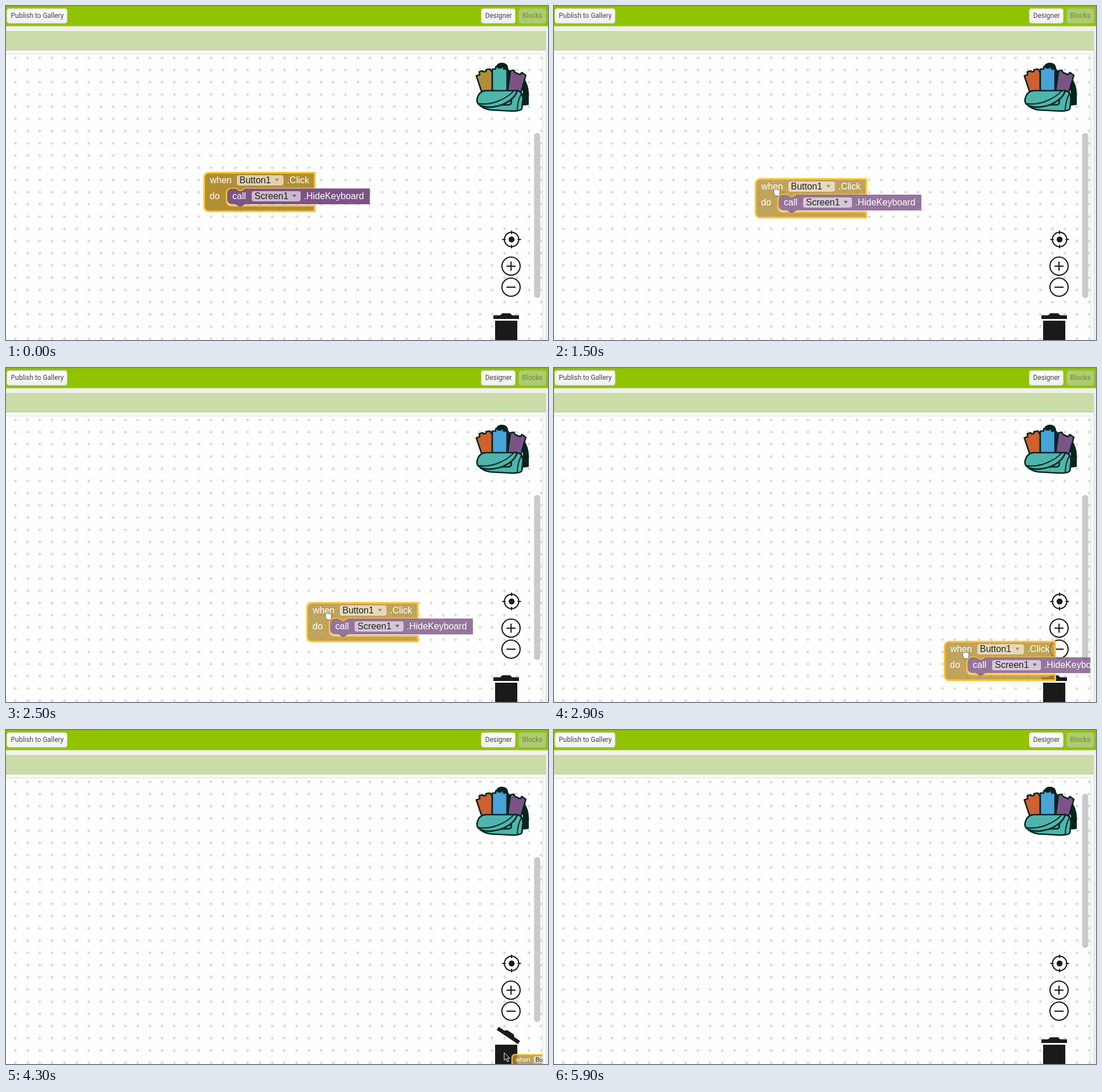
An HTML page for the animation above (6500 ms loop, 953 px wide and 588 px high).

```html
<!DOCTYPE html>
<html lang="en">
<head>
<meta charset="utf-8">
<title>Deleting a block</title>
<style>
html, body { margin: 0; width: 100%; height: 100%; overflow: hidden; background: #fff; }
svg { display: block; width: 953px; height: 588px; }
.ui { font: 12px Roboto, Arial, sans-serif; fill: #444; }
.code { font: 16px "Liberation Sans", Arial, sans-serif; fill: #fff; }
.code .field { fill: #222; }
.held .shape { fill-opacity: .8; }
.icon { fill: #fff; stroke: #1a1a1a; stroke-width: 2.1; }
.pack { stroke: #06231f; stroke-width: 2.6; stroke-linejoin: round; stroke-linecap: round; }
</style>
</head>
<body>
<svg viewBox="0 0 953 588">
  <defs>
    <linearGradient id="btn" x2="0" y2="1">
      <stop stop-color="#fff"/><stop offset="1" stop-color="#efefef"/>
    </linearGradient>
    <pattern id="grid" x="5.5" y="80.5" width="21.5" height="21.5" patternUnits="userSpaceOnUse">
      <path d="M8 10.75h6M11 7.75v6" stroke="#c0c0c0"/>
    </pattern>
    <clipPath id="space"><path d="M0 85H943V588H0z"/></clipPath>
  </defs>

  <rect width="953" height="588" fill="#f0f1ec"/>
  <rect width="953" height="35.5" fill="#91c300"/>
  <rect width="953" height="1" fill="#86b30c"/>
  <rect y="44" width="949" height="34" fill="#ccdca9"/>
  <rect y="77" width="949" height="1" fill="#b5c79a"/>
  <rect y="78" width="949" height="510" fill="#f8faf5"/>
  <path d="M949.5 44V588" stroke="#d9dad5"/>
  <rect y="85" width="943" height="503" fill="#fefefe"/>
  <rect y="85" width="943" height="503" fill="url(#grid)"/>
  <path d="M0 84.5H943.5V588" fill="none" stroke="#dde0d8"/>

  <g class="ui">
    <rect x="1.5" y="4.5" width="106" height="26" rx="4" fill="url(#btn)" stroke="#c8ccbe"/>
    <rect x="835.5" y="4.5" width="60" height="26" rx="4" fill="url(#btn)" stroke="#c8ccbe"/>
    <rect x="901.5" y="4.5" width="48" height="26" rx="4" fill="#adcb74" stroke="#a2c45c"/>
    <text x="8.5" y="21">Publish to Gallery</text>
    <text x="842.5" y="21">Designer</text>
    <text x="907.5" y="21" fill="#6f8a32">Blocks</text>
  </g>

  <g class="pack">
    <path d="M861 112Q863 101 872 101T882 111L890 122V150H848V122z" fill="#06231f"/>
    <path d="M909 126Q918 140 918 154L918 173 910 174Q912 150 906 134z" fill="#06231f"/>
    <path id="card1" d="M827 123l6 -2 -1 -5 6 -2 2 2 4 -1 0 -3 7 -1 4 6V150H836z"/>
    <path d="M887 114l6 -1 2 4 9 4 3 -4 7 5L905 153 882 150z" fill="#7c5385"/>
    <path id="card2" d="M855 111h6v-4h3l2 2h4l2 -2h3v4h6V150H855z"/>
    <path d="M838 151L899 149Q909 151 909 163L907 181Q905 185 890 185L852 183Q838 181 832 173z" fill="#4fb5ac"/>
    <path d="M868 174l19 -14 2 3 -1 9 -3 2z" fill="#4fb5ac"/>
    <path d="M828 166Q830 150 844 149L899 149Q894 165 872 174Q850 181 836 176Q828 173 828 166z" fill="#4fb5ac"/>
    <path d="M832 172Q848 174 864 168Q884 160 892 150M907 153Q899 167 899 184" fill="none" stroke-width="2"/>
  </g>

  <g class="icon">
    <circle cx="889" cy="411" r="12.6"/>
    <path d="M889 395.500v6M889 420.500v6M872.500 411h6M899.500 411h6"/>
    <circle cx="889" cy="411" r="4.200" fill="#1a1a1a"/>
    <circle cx="888" cy="458" r="16"/>
    <path d="M880 458h16M888 450v16"/>
    <circle cx="888" cy="495" r="16"/>
    <path d="M880 495h16"/>
  </g>
  <rect id="bar" x="928.5" width="11" rx="5.5" fill="#cacaca"/>

  <g fill="#1a1a1a">
    <rect x="860" y="554" width="39" height="34"/>
    <path id="lid" d="M857 551v-6.500h12l3.500 -3.500h14l3.500 3.500h12v6.500z"/>
  </g>

  <g clip-path="url(#space)">
    <g id="block" class="code">
      <path class="shape" d="M9.500 1.500H196V29.500H73l-6 4h-4l-6 -4H49a8 8 0 0 0 -8 8V51.500a8 8 0 0 0 8 8H196V69.500H9.500a8 8 0 0 1 -8 -8V9.500a8 8 0 0 1 8 -8z"
        fill="#b18e35" stroke="#fdc52e" stroke-width="3"/>
      <path class="shape" d="M50 29.500H57l6 4h4l6 -4H293V57H73l-6 4h-4l-6 -4H50a8 8 0 0 1 -8 -8V37.500a8 8 0 0 1 8 -8z" fill="#7c5385"/>
      <path d="M73 29.500H292.500V57" fill="none" stroke="#9a7aa2"/>
      <g fill="#fff" fill-opacity=".6">
        <rect x="59" y="6" width="82" height="18" rx="4"/>
        <rect x="85" y="34" width="86" height="18" rx="4"/>
      </g>
      <path d="M126 12h7l-3.500 5z" fill="#b18e35"/>
      <path d="M156.500 40h7l-3.500 5z" fill="#7c5385"/>
      <text x="11.500" y="20">when</text>
      <text x="11" y="47.500">do</text>
      <text x="51" y="48">call</text>
      <text x="147" y="20">.Click</text>
      <text x="176.500" y="48">.HideKeyboard</text>
      <text class="field" x="63.500" y="20">Button1</text>
      <text class="field" x="90" y="48">Screen1</text>
    </g>
  </g>

  <g id="arrow">
    <path d="M0 0V13.500L3.200 10.600 5.600 16 8 15 5.600 9.800H9.800z" fill="#111" stroke="#fff"/>
  </g>
  <g id="open" fill="#fff" stroke="#222">
    <path d="M-3 7L-6.500 1q0 -2 2 -1l1.500 2V-5q1.300 -2 2.300 0q1.300 -2.500 2.600 0q1.300 -1.600 2.500 .5q1.400 -1 2 .8V3L4.500 7z"/>
  </g>
  <g id="fist" fill="#fff" stroke="#444" stroke-width=".8">
    <path d="M-2.500 6.500L-5.500 2V-3q1 -2.500 2.700 -1.500q1.500 -2 2.800 0q1.500 -1.500 2.700 .4q2 -.8 2.600 1.100V2L4 6.500z"/>
  </g>
</svg>
<script>
const LOOP = 6500, STEP = 100;
const HOME = [347, 292], GRIP = [39, 25];
const PICK = 1500, DROP = 4300;
const parts = Object.fromEntries([...document.querySelectorAll('[id]')].map(e => [e.id, e]));

// Way points: time, x, y
const enter = [[300, 478, 592], [500, 433, 448], [900, 387, 322], [1000, 385, 314]];
const drag = [[1400, 0, 0], [1500, 6, 11], [2500, 181, 120], [3300, 469, 242], [3700, 493, 255]];
const leave = [[5000, 876, 568], [5100, 877, 566], [5500, 889, 575], [5900, 900, 604]];

const clamp = v => Math.max(0, Math.min(1, v));

// Monotone cubic through one coordinate of the way points
function along(pts, t, c) {
  const last = pts.length - 1;
  if (t <= pts[0][0]) return pts[0][c];
  if (t >= pts[last][0]) return pts[last][c];
  const slope = i => (pts[i + 1][c] - pts[i][c]) / (pts[i + 1][0] - pts[i][0]);
  const tangent = i => {
    if (i === 0) return slope(0);
    if (i === last) return 0;
    const a = slope(i - 1), b = slope(i);
    return a * b > 0 ? 2 * a * b / (a + b) : 0;
  };
  const i = pts.findIndex(p => p[0] > t) - 1;
  const [p, q] = [pts[i], pts[i + 1]];
  const h = q[0] - p[0], u = (t - p[0]) / h, v = 1 - u;
  return (1 + 2 * u) * v * v * p[c] + u * v * v * h * tangent(i)
    + u * u * (3 - 2 * u) * q[c] - u * u * v * h * tangent(i + 1);
}
const at = (pts, t) => [along(pts, t, 1), along(pts, t, 2)];

function place(el, [x, y], scale = 1) {
  el.setAttribute('transform', `translate(${x} ${y}) scale(${scale})`);
}

function cursor(t, block) {
  if (t < 400 || t >= 5900) return ['none', [0, 0]];
  if (t < 1000) return ['arrow', at(enter, t)];
  if (t < PICK) return ['open', [385.5, 316]];
  if (t < DROP) return ['fist', [block[0] + GRIP[0], block[1] + GRIP[1]]];
  return ['arrow', at(leave, t)];
}

function draw(t) {
  const block = at(drag, t).map((d, i) => HOME[i] + d);
  const gone = t < DROP ? 0 : clamp((t - DROP + 50) / 150);
  place(parts.block, [block[0] + 146 * gone, block[1] + 70 * gone], 1 - gone);
  parts.block.classList.toggle('held', t >= PICK);
  parts.block.style.display = gone === 1 ? 'none' : '';

  const angle = t < DROP ? 45 * clamp((t - 3200) / 200) : 45 * clamp((4600 - t) / 400);
  parts.lid.setAttribute('transform', `rotate(${angle} 898 549)`);

  const cleared = t >= 4400;
  parts.bar.setAttribute('y', cleared ? 112 : 223.5);
  parts.bar.setAttribute('height', cleared ? 271.5 : 290.5);

  parts.card1.setAttribute('fill', t < 300 ? '#b18e35' : '#cf6030');
  parts.card2.setAttribute('fill', t < 300 ? '#4fb5ac' : '#48a3d8');

  const [shape, pos] = cursor(t, block);
  for (const name of ['arrow', 'open', 'fist']) {
    parts[name].style.display = name === shape ? '' : 'none';
  }
  if (shape !== 'none') place(parts[shape], pos);
}

const start = performance.now();
function tick() {
  const t = (performance.now() - start) % LOOP;
  draw(Math.floor(t / STEP) * STEP);
  requestAnimationFrame(tick);
}
tick();
</script>
</body>
</html>
```
